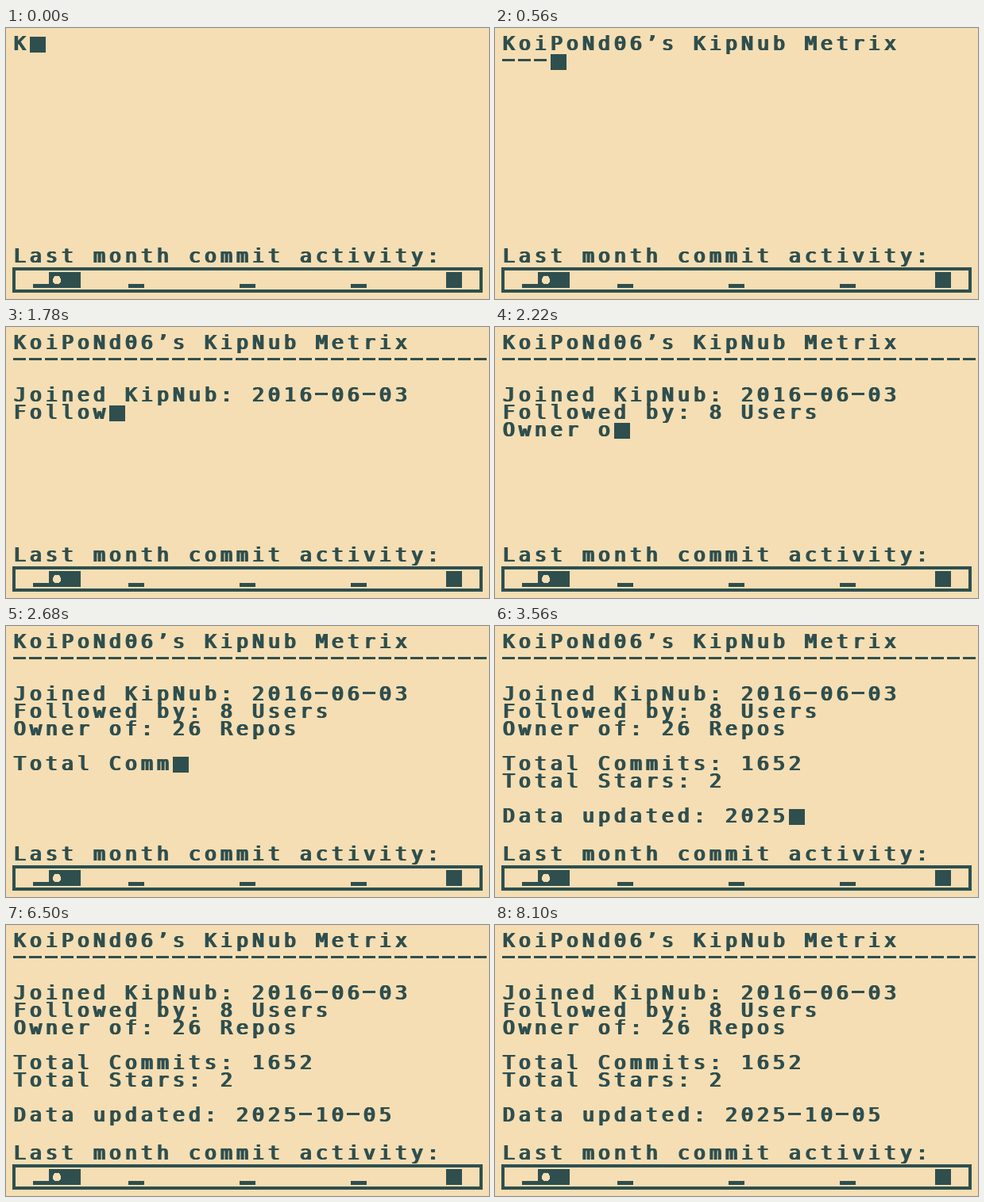
These frames come from a looping animation (608 by 342 pixels, 8.5 s). An HTML page:

```html
<!DOCTYPE html>
<html lang="en">
<head>
<meta charset="utf-8">
<title>Profile terminal</title>
<style>
  :root { --paper: #f5deb3; --ink: #2f4f4f; }
  html, body { margin: 0; width: 100%; height: 100%; overflow: hidden; background: var(--paper); }
  #stage { position: relative; width: 608px; height: 342px; overflow: hidden; color: var(--ink); }
  /* the shadows broaden upright strokes only */
  pre {
    position: absolute; left: 9px; margin: 0;
    font: 25px/22px "DejaVu Sans Mono", monospace;
    letter-spacing: calc(20px - 1ch);
    font-variant-ligatures: none;
    text-shadow: 1px 0 var(--ink), 2px 0 var(--ink);
  }
  #screen { top: 9px; }
  #caption { top: 277px; }
  #cursor { position: absolute; left: 0; top: 0; width: 20px; height: 20px; background: var(--ink); }
  /* wide hyphen, raised to the middle of the capitals */
  .dash {
    color: transparent;
    text-shadow: none;
    background: linear-gradient(var(--ink), var(--ink)) 0 12px / 16px 3px no-repeat;
  }
  svg { position: absolute; left: 0; top: 0; }
</style>
</head>
<body>
<div id="stage">
  <pre id="screen"></pre>
  <div id="cursor"></div>
  <pre id="caption">Last month commit activity:</pre>
  <svg width="608" height="342" fill="#2f4f4f" shape-rendering="crispEdges">
    <rect x="10" y="304" width="588" height="28" fill="none" stroke="#2f4f4f" stroke-width="4"/>
    <path d="M34 323h20v5h-20z M154 323h20v5h-20z M294 323h20v5h-20z M434 323h20v5h-20z"/>
    <path d="M54 308h40v20h-40z M554 308h20v20h-20z"/>
    <path fill="#f5deb3" d="M59 316h10v5h-10z M61 313h6v10h-6z M60 314h8v8h-8z"/>
  </svg>
</div>
<script>
  const LOOP = 8500, STEP = 20, BLINK = 400;
  const CELL = 20, LINE = 22, LEFT = 10, TOP = 11;

  const text = [
    "KoiPoNd06\u2019s KipNub Metrix",
    "-".repeat(30),
    "",
    "Joined KipNub: 2016-06-03",
    "Followed by: 8 Users",
    "Owner of: 26 Repos",
    "",
    "Total Commits: 1652",
    "Total Stars: 2",
    "",
    "Data updated: 2025-10-05"
  ].join("\n");

  const screen = document.getElementById("screen");
  const cursor = document.getElementById("cursor");
  const typedAt = text.length * STEP;
  const start = performance.now();
  let shown = -1;

  function type(count) {
    if (count === shown) return;
    shown = count;
    const typed = text.slice(0, count);
    const lines = typed.split("\n");
    const row = lines.length - 1;
    const col = lines[row].length;
    screen.innerHTML = typed.replace(/-/g, '<span class="dash">-</span>');
    cursor.style.transform =
      `translate(${LEFT + col * CELL}px, ${TOP + row * LINE}px)`;
  }

  function draw() {
    const t = Math.max(0, performance.now() - start) % LOOP;
    type(Math.min(text.length, Math.floor(t / STEP) + 1));
    const blink = Math.floor((t - typedAt) / BLINK);
    const visible = t < typedAt || blink % 2 === 0;
    cursor.style.visibility = visible ? "visible" : "hidden";
    requestAnimationFrame(draw);
  }

  draw();
</script>
</body>
</html>
```
